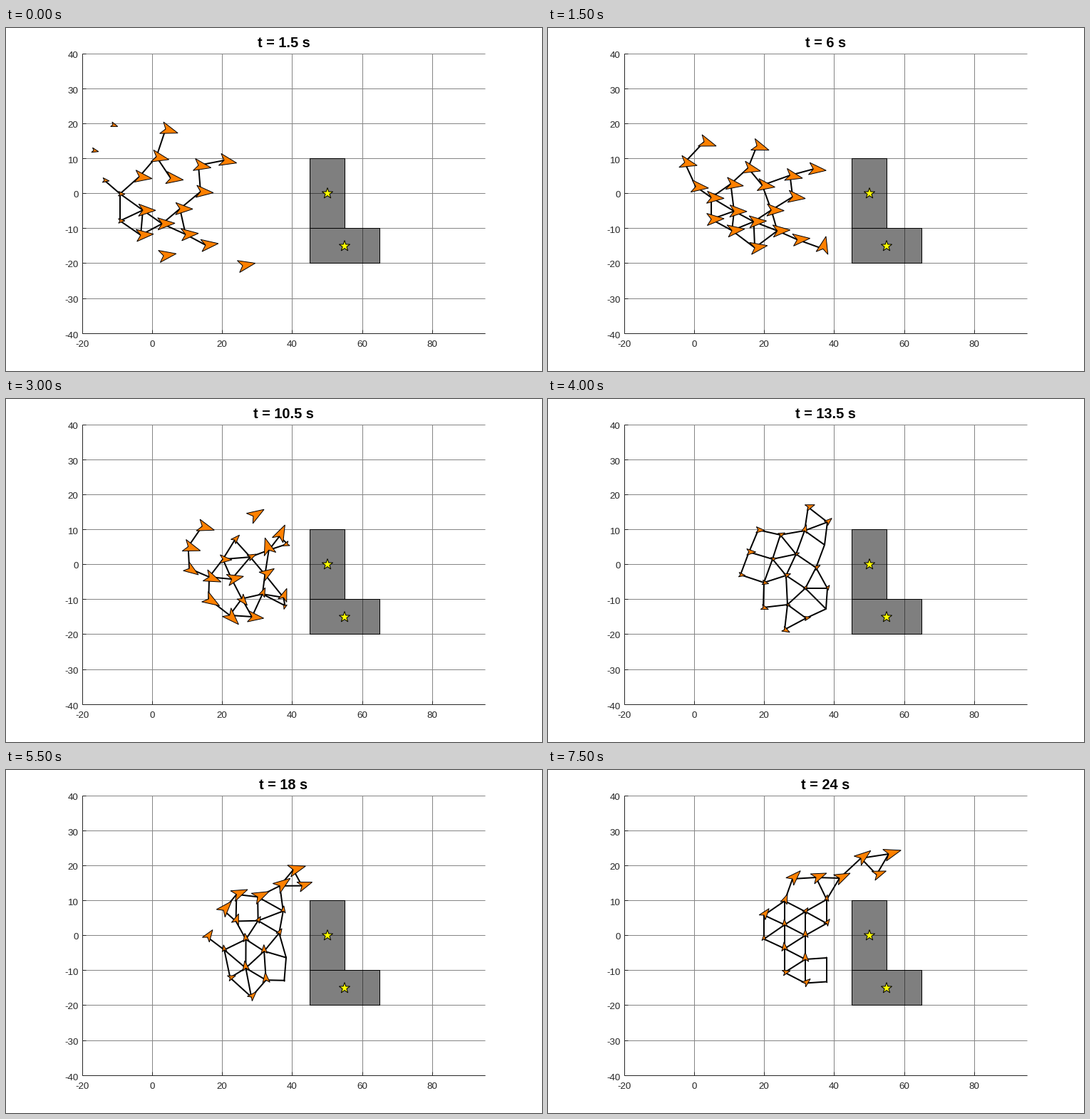
Write a matplotlib script that moves like this. It is 752 px wide and 482 px high and loops after 8 s.

```python
import numpy as np
import matplotlib.pyplot as plt
from matplotlib.animation import FuncAnimation
from matplotlib.collections import LineCollection, PolyCollection
from matplotlib.patches import Polygon, Rectangle

W, H, DPI = 752, 482, 100
FRAMES, STEP = 16, 500
PX = 72 / DPI                      # one pixel in points
INK, GRID = "#262626", "#858585"
CRUISE, WALL, CENTRE = 45.5, 389, 262
LINK, PITCH = 41.6, 33.5           # link reach and lattice spacing
ARROW = np.array([(.75, 0), (-.25, .355), (0, 0), (-.25, -.355)])

plt.rcParams["font.family"] = "Liberation Sans"
fig = plt.figure(figsize=(W / DPI, H / DPI), dpi=DPI, facecolor="white")
ax = fig.add_axes([0, 0, 1, 1])
ax.set_xlim(0, W)
ax.set_ylim(H, 0)
ax.axis("off")


def sx(x):
    return np.floor(205.4 + 4.9125 * x) + .5


def sy(y):
    return np.floor(232.65 - 4.915 * y) + .5


def line(x0, y0, x1, y1, color):
    ax.plot([x0, x1], [y0, y1], color=color, lw=PX, zorder=1,
            solid_capstyle="butt", snap=False)


def label(x, y, text, align):
    ax.text(x, y, text, size=13.33 * PX, color=INK, ha=align, va="baseline")


def draw_axes():
    left, right, top, base = sx(-20), sx(95), sy(40), sy(-40)
    for x in range(-20, 81, 20):
        line(sx(x), top, sx(x), base, GRID)
        line(sx(x), base, sx(x), base - 5, INK)
        label(sx(x) - .5, 448, str(x), "center")
    for y in range(-40, 41, 10):
        line(left, sy(y), right, sy(y), GRID)
        line(left, sy(y), left + 5, sy(y), INK)
        label(101.5, sy(y) + 6, str(y), "right")
    line(left, top, left, base, INK)
    line(left, base, right, base, INK)


def block(x0, y0, x1, y1):
    ax.add_patch(Rectangle((sx(x0), sy(y0)), sx(x1) - sx(x0), sy(y1) - sy(y0),
                           fc=(0, 0, 0, .5), ec="black", lw=PX, zorder=2,
                           snap=False))


def star(x, y):
    a = np.arange(10) * np.pi / 5
    r = np.where(np.arange(10) % 2, 3.1, 8)
    pts = np.c_[sx(x) - .5 + r * np.sin(a), sy(y) - r * np.cos(a)]
    ax.add_patch(Polygon(pts, fc="yellow", ec="black", lw=PX, zorder=3))


draw_axes()
block(45, -10, 55, 10)
block(45, -20, 65, -10)
star(50, 0)
star(55, -15)

# Each bird: where it starts, and its place in the huddle before the wall.
BIRDS = np.array([
    (138, 214, 270, 247), (160, 233, 303, 258), (187, 209, 315, 225),
    (192, 256, 334, 248), (219, 275, 336, 289), (189, 291, 302, 293),
    (231, 211, 348, 218), (252, 290, 361, 266), (221, 320, 362, 308),
    (189, 291, 332, 324), (306, 186, 388, 205), (244, 254, 376, 237),
    (280, 305, 392, 266), (332, 334, 390, 295), (123, 172, 282, 215),
    (150, 136, 295, 184), (211, 181, 326, 191), (273, 230, 360, 185),
    (270, 193, 392, 173), (224, 142, 365, 152)], float)
BIRDS[5, :2] = 160, 271
start, huddle = BIRDS[:, :2], BIRDS[:, 2:]


def cruise(t):
    """Fly right while closing in on the centre line; the wall turns birds up."""
    x = start[:, 0] + CRUISE * t
    over = np.maximum(x - WALL, 0)
    y = start[:, 1] + .125 * t * (CENTRE - start[:, 1]) - .6 * over
    return np.c_[x - over, y]


def column(x, top, count):
    return [(x, top + PITCH * i) for i in range(count)]


# The flock settles into a lattice while the leaders slip over the wall.
lattice = (column(303, 204, 2) + column(332, 184, 4) + column(361, 199, 4)
           + column(391, 182, 2) + column(391, 264, 2))
leaders = [(343, 153), (376, 151), (409, 152), (439, 124), (461, 147), (478, 118)]

TIMES = np.array([0, 1, 2, 4, 7.5])
spots = np.array([cruise(0), cruise(1), cruise(2), huddle, lattice + leaders])
speeds = np.gradient(spots, TIMES, axis=0)
speeds[0, start[:, 0] < 165] *= .15      # stragglers start slowly
speeds[3] *= .4                          # the huddle nearly stops


def place(t):
    i = int(np.clip(np.searchsorted(TIMES, t, "right") - 1, 0, len(TIMES) - 2))
    span = TIMES[i + 1] - TIMES[i]
    u = (t - TIMES[i]) / span
    ease = u * u * (3 - 2 * u)
    bend = (1 - u) * speeds[i] - u * speeds[i + 1]
    return spots[i] * (1 - ease) + spots[i + 1] * ease + span * u * (1 - u) * bend


def arrow(spot, velocity):
    """Point along the velocity; faster birds are longer."""
    speed = np.hypot(*velocity) + 1e-6
    size = 24 * min(1, speed / 30) ** .65
    dx, dy = velocity / speed
    return spot + size * ARROW @ np.array([(dx, dy), (-dy, dx)])


links = LineCollection([], colors="black", linewidths=2 * PX, zorder=4)
flock = PolyCollection([], facecolors="#ff8000", edgecolors="black",
                       linewidths=PX, joinstyle="miter", zorder=5)
ax.add_collection(links, autolim=False)
ax.add_collection(flock, autolim=False)
title = ax.text(389.5, 27, "", size=20 * PX, weight="bold", color="black",
                ha="center", va="baseline")


def update(n):
    t = n * STEP / 1000
    spot = place(t)
    velocity = (place(t + .01) - place(t - .01)) / .02
    gap = np.linalg.norm(spot[:, None] - spot, axis=2)
    pairs = np.argwhere(np.triu(gap < LINK, 1))
    links.set_segments(spot[pairs])
    flock.set_verts([arrow(*b) for b in zip(spot, velocity)])
    title.set_text(f"t = {1.5 * (n + 1):g} s")
    return links, flock, title


anim = FuncAnimation(fig, update, frames=FRAMES, interval=STEP,
                     repeat=True, repeat_delay=0)
plt.show()
```
